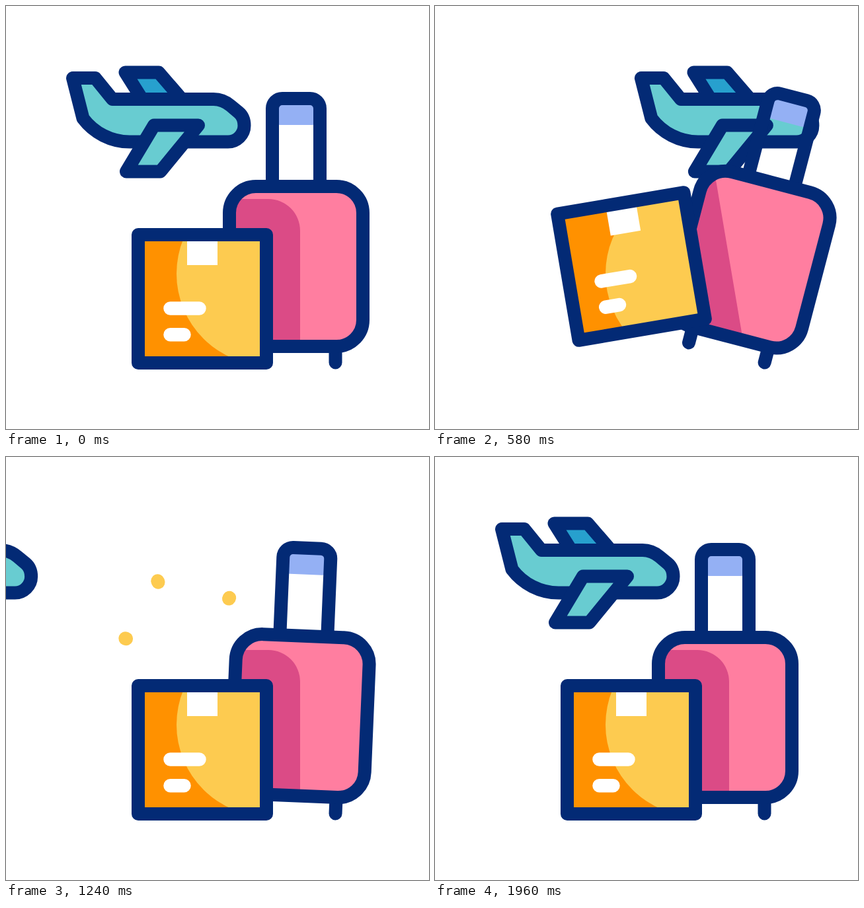
An HTML page for the animation above (2.4 s loop, 640 by 640 pixels).

```html
<!DOCTYPE html>
<html lang="en">
<head>
<meta charset="utf-8">
<title>Travel luggage</title>
<style>
  html, body { margin: 0; width: 100%; height: 100%; overflow: hidden; background: #fff; }
  svg { display: block; width: 100%; height: 100%; }
  .line { fill: none; stroke: #032a75; stroke-width: 20; stroke-linejoin: round; stroke-linecap: round; }
  .teal { fill: #68ccd1; }
  .blue { fill: #27a0ce; }
</style>
</head>
<body>
<svg viewBox="0 0 640 640">
  <defs>
    <clipPath id="caseClip"><rect id="caseInner" x="338" y="273" width="202" height="242" rx="40"/></clipPath>
    <clipPath id="boxClip"><rect id="boxInner" x="200" y="346" width="194" height="194"/></clipPath>
  </defs>

  <g id="plane">
    <path class="line blue" d="M180.500 100.500H231L266 141H206Z"/>
    <path class="line teal" d="M101 109H135L161 141H314C325 141 333 145 340 151L352 161C358 166 360.500 173 360.500 181C360.500 194.500 349 205.500 336 205.500H187C159 205.500 133 192 116.500 170Z"/>
    <path class="line teal" d="M224 180.500H291L233.500 250.500H182Z"/>
  </g>

  <g id="caseBack">
    <rect x="403" y="140" width="72" height="40" rx="12" fill="#94b0f4"/>
    <path class="line" d="M403 273V155a15 15 0 0 1 15-15h42a15 15 0 0 1 15 15V273M380 515V539.500M498.500 515V539.500"/>
    <rect x="338" y="273" width="202" height="242" rx="40" fill="#ff7ea0"/>
  </g>
  <g clip-path="url(#caseClip)">
    <path id="shadow" fill="#db4b86" d="M230 292H397a48 48 0 0 1 48 48V620H230Z"/>
  </g>
  <rect id="caseRim" class="line" x="338" y="273" width="202" height="242" rx="40"/>

  <g id="sparks" stroke="#fdcb50" stroke-width="20.500" stroke-linecap="round"></g>

  <g clip-path="url(#boxClip)">
    <rect x="100" y="200" width="400" height="400" fill="#ff9100"/>
    <circle cx="397" cy="405" r="139" fill="#fdcb50"/>
  </g>
  <g id="box">
    <rect x="274" y="350" width="46" height="42" fill="#fff"/>
    <path d="M248.500 457.500H292.500M248.500 497.300H269.500" stroke="#fff" stroke-width="20.500" stroke-linecap="round"/>
    <rect class="line" x="200" y="346" width="194" height="194"/>
  </g>
</svg>
<script>
  const LOOP = 2400;
  const $ = id => document.getElementById(id);
  const move = (transform, ...ids) => ids.forEach(id => $(id).setAttribute('transform', transform));

  // Progress of t between two times, held at both ends
  const span = (t, from, to) => Math.min(1, Math.max(0, (t - from) / (to - from)));
  const smooth = (t, from, to) => {
    const u = span(t, from, to);
    return u * u * (3 - 2 * u);
  };

  // cubic-bezier(a, 0, b, 1), solved by bisection
  function bezier(a, b, x) {
    let lo = 0, hi = 1;
    for (let i = 0; i < 30; i++) {
      const s = (lo + hi) / 2, r = 1 - s;
      if (3 * r * r * s * a + 3 * r * s * s * b + s * s * s < x) lo = s; else hi = s;
    }
    return lo * lo * (3 - 2 * lo);
  }

  const sparks = [[267, 274, 229.5, 187.5], [302, 275, 338, 213], [244, 301, 180.5, 274.5]].map(path => {
    const el = document.createElementNS('http://www.w3.org/2000/svg', 'line');
    $('sparks').append(el);
    return { el, path };
  });

  function drawSparks(t) {
    const head = smooth(t, 820, 1125), tail = smooth(t, 938, 1270);
    $('sparks').setAttribute('visibility', head > 0 && tail < 1 ? 'visible' : 'hidden');
    for (const { el, path: [x, y, endX, endY] } of sparks) {
      const put = (n, p) => {
        el.setAttribute('x' + n, x + (endX - x) * p);
        el.setAttribute('y' + n, y + (endY - y) * p);
      };
      put(1, tail);
      put(2, head);
    }
  }

  function draw(t) {
    const flight = t < 1080
      ? 550 * bezier(0.686, 0.56, t / 1080)
      : -373 * (1 - bezier(0.333, 0.276, span(t, 1080, 1960)));
    move(`translate(${flight} 0)`, 'plane');

    const lean = 14.75 * (smooth(t, 0, 606) - smooth(t, 780, 1400));
    move(`rotate(${lean} 498.500 540)`, 'caseBack', 'caseInner', 'caseRim');

    const jump = smooth(t, 0, 560) - smooth(t, 560, 765);
    const hop = smooth(t, 765, 940) - smooth(t, 940, 1120);
    const lift = 50.5 * jump + 25.4 * hop;
    move(`translate(0 ${-lift}) rotate(${-9.9 * jump} 297 443)`, 'box', 'boxInner', 'shadow');

    drawSparks(t);
  }

  function tick() {
    draw(performance.now() % LOOP);
    requestAnimationFrame(tick);
  }
  tick();
</script>
</body>
</html>
```
